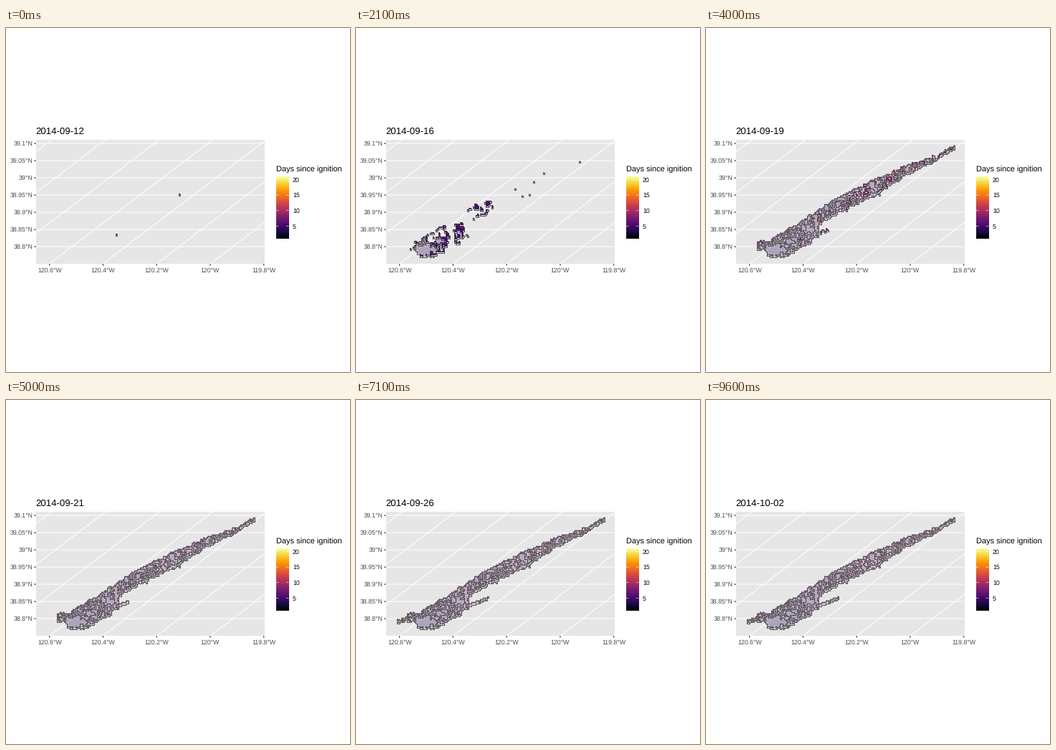
These frames come from a looping animation (480 px wide and 480 px high, 10 s). A matplotlib script:

```python
import numpy as np
import matplotlib.pyplot as plt
from matplotlib.animation import FuncAnimation
from matplotlib.collections import LineCollection
from matplotlib.patches import Rectangle

plt.rcParams["font.family"] = "Liberation Sans"
plt.rcParams["text.hinting"] = "none"

SIZE, DPI = 480, 72
LEFT, RIGHT, TOP, BOTTOM = 42, 360.5, 155.5, 329
CELL, X0, Y0 = 2, 40.5, 155.5
COLS, ROWS = 160, 87
INFERNO = plt.get_cmap("inferno")
DATES = [f"2014-09-{d}" for d in range(12, 31)] + ["2014-10-02"]
# Days since ignition, scaled to 0..1; the last date follows a gap of one day
SHADE = np.append(np.arange(19), 20) / 20
STARTS = [0, 5] + list(range(11, 102, 5))

# Northern and southern edge of the burned band
NORTH = [(70, 299), (90, 294), (122, 276), (160, 250), (182, 236),
         (235, 211), (275, 193), (312, 181), (346, 164)]
SOUTH = [(70, 306), (83, 309), (85, 317), (97, 320), (110, 318), (156, 291),
         (157, 274), (197, 251), (240, 230), (275, 206), (310, 190), (346, 168)]
IGNITION = [(241.5, 232.5), (153.5, 288.5)]

rng = np.random.default_rng(14)


def smooth_noise(n):
    field = rng.normal(size=(ROWS, COLS))
    for axis in (0, 1):
        field = sum(np.roll(field, k, axis) for k in range(n))
    return field / field.std()


def burn_days():
    """Index of the date each cell burned on, -1 where it never does."""
    x, y = np.meshgrid(X0 + CELL * (np.arange(COLS) + 0.5),
                       Y0 + CELL * (np.arange(ROWS) + 0.5))
    wobble = smooth_noise(3)
    north = np.interp(x, *zip(*NORTH)) + wobble
    south = np.interp(x, *zip(*SOUTH)) + wobble
    band = (x > 70) & (x < 346) & (y > north) & (y < south)

    # The fire runs north-east, with patches ahead of and behind the front
    noise = 0.6 * smooth_noise(2) + 0.75 * smooth_noise(6)
    mean = np.interp(x, [70, 95, 130, 200, 260, 345], [4.8, 3.8, 4.8, 5.7, 6.3, 6.5])
    earliest = np.select([x > 200, x > 135], [5, 4], 2)
    spread = np.clip(np.round(mean + noise), earliest, 9)
    core = ((x - 98) / 15) ** 2 + ((y - 309) / 7) ** 2 < 1
    spread[core] = np.where(noise[core] > 0.5, 4, 3)
    sparks = (x > 180) & (rng.random(x.shape) < 0.012)
    spread[sparks] = 3

    # Two narrow arms burn late
    late = np.minimum(12 + rng.exponential(1.7, x.shape), 19)
    tongue = (x > 56) & (x <= 72) & (abs(y - 308 + 0.35 * (x - 60)) < 2.6)
    spur = (x > 157) & (x < 185) & (abs(y - 286 + 0.37 * (x - 157)) < 2)

    day = np.full(x.shape, -1)
    day[tongue] = late[tongue]
    day[spur] = np.where(x < 171, 8, late)[spur]
    day[band] = spread[band]
    for px, py in IGNITION:
        day[int((py - Y0) // CELL), int((px - X0) // CELL)] = 0
    return day


DAY = burn_days()
ORDER = rng.random(DAY.shape)


def phase(frame):
    """State index and how far it has moved towards the next one."""
    state = np.searchsorted(STARTS, frame, side="right") - 1
    steps = 2 if state < 2 else 1
    left = STARTS[state + 1] - frame
    return state, max(0, 1 - left / (steps + 1))


def outlines(label):
    """Edges between cells that burned on different dates."""
    padded = np.pad(label, 1, constant_values=-1)

    def segments(r, c, dx, dy):
        x, y = X0 + CELL * c, Y0 + CELL * r
        return np.stack([np.stack([x, y], 1), np.stack([x + dx, y + dy], 1)], 1)

    upright = segments(*np.nonzero(np.diff(padded[1:-1], axis=1)), 0, CELL)
    flat = segments(*np.nonzero(np.diff(padded[:, 1:-1], axis=0)), CELL, 0)
    return np.concatenate([upright, flat])


fig = plt.figure(figsize=(SIZE / DPI, SIZE / DPI), dpi=DPI, facecolor="white")
ax = fig.add_axes([0, 0, 1, 1])
ax.axis("off")


def line(x, y, color, width=1.07):
    return ax.plot(x, y, color=color, lw=width, solid_capstyle="butt", snap=False)[0]


def label(x, y, text, size, color="black", ha="left"):
    return ax.text(x, y, text, size=size, color=color, ha=ha, va="baseline")


panel = Rectangle((LEFT, TOP), RIGHT - LEFT, BOTTOM - TOP, fc="#e6e6e6", ec="none")
ax.add_patch(panel)

for k in range(7):
    y = 161.1 + 24 * k
    line([LEFT, RIGHT], [y, y], "white")
    line([LEFT - 2.75, LEFT], [y, y], "#333333")
    label(37.3, y + 3.1, f"{39.1 - 0.05 * k:.4g}°N", 8.8, "#4d4d4d", "right")

# Meridians lean over in the sinusoidal projection
for k in range(-3, 5):
    x = 60.7 + 74.75 * k
    lean = line([x, x + 1.315 * (BOTTOM - TOP)], [BOTTOM, TOP], "white")
    lean.set_clip_path(panel)
    if k >= 0:
        line([x, x], [BOTTOM, BOTTOM + 2.75], "#333333")
        label(x, 341, f"{120.6 - 0.2 * k:.4g}°W", 8.8, "#4d4d4d", "center")

label(377, 201, "Days since ignition", 11)
ax.imshow(INFERNO(np.linspace(1, 0, 256))[:, None], extent=(377, 394.3, 293.6, 207.2),
          aspect="auto", interpolation="nearest")
for value in (5, 10, 15, 20):
    y = 293.6 - 4.32 * (value - 1)
    line([377, 380.5], [y, y], "white", 0.6)
    line([390.8, 394.3], [y, y], "white", 0.6)
    label(400, y + 3.2, str(value), 8.8)

title = label(41.4, 148, "", 13.2)
fill = ax.imshow(np.zeros((ROWS, COLS, 4)), interpolation="nearest", aspect="auto", zorder=3,
                 extent=(X0, X0 + CELL * COLS, Y0 + CELL * ROWS, Y0))
edges = LineCollection([], colors="#484848", linewidths=1, capstyle="projecting", zorder=4)
ax.add_collection(edges)
ax.set_xlim(0, SIZE)
ax.set_ylim(SIZE, 0)


def draw(frame):
    state, mix = phase(frame)
    after = min(state + 1, len(DATES) - 1)
    arriving = (DAY == state + 1) & (ORDER < mix)
    shown = (DAY >= 0) & (DAY <= state) | arriving
    active = arriving | (DAY == state) & (ORDER >= mix)

    rgba = INFERNO(SHADE[np.maximum(DAY, 0)])
    rgba[..., 3] = np.where(shown, 0.3, 0)
    rgba[active] = INFERNO((1 - mix) * SHADE[state] + mix * SHADE[after])
    fill.set_data(rgba)
    edges.set_segments(outlines(np.where(shown, DAY, -1)))
    title.set_text(DATES[after if mix > 0.5 else state])
    return fill, edges, title


anim = FuncAnimation(fig, draw, frames=100, interval=100, repeat=True, repeat_delay=0)
plt.show()
```
